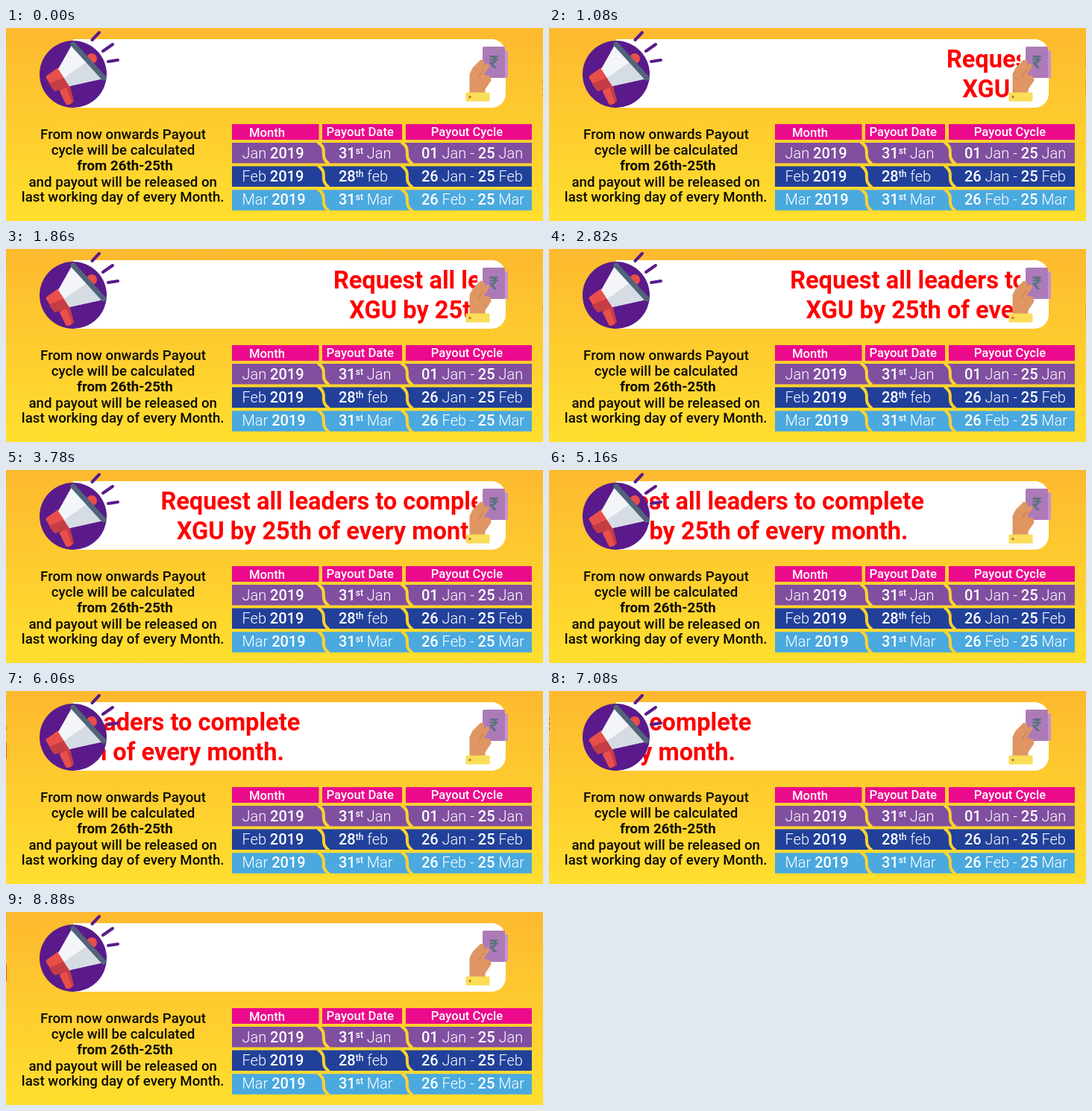
An HTML page with a canvas that plays this animation: 720 px wide and 259 px high, repeating every 8950 ms.

```html
<!DOCTYPE html>
<html lang="en">
<head>
<meta charset="utf-8">
<title>Payout notice</title>
<style>
  html, body { margin: 0; width: 720px; height: 259px; overflow: hidden; }
  canvas { display: block; }
</style>
</head>
<body>
<canvas id="stage" width="720" height="259"></canvas>
<script>
const W = 720, H = 259, LOOP = 8950, STEP = 30, LAST = 8880;
const SPEED = 108.5 / 900;   // px per ms
const START = 894;           // centre of the banner text at time 0
const ctx = document.getElementById('stage').getContext('2d');
const font = (weight, size) => `${weight} ${size}px Roboto, Arial, sans-serif`;

function rect(c, color, x, y, w, h, r = 0) {
  c.fillStyle = color;
  c.beginPath();
  c.roundRect(x, y, w, h, r);
  c.fill();
}

function poly(c, color, pts, round = 0) {
  c.beginPath();
  pts.forEach(([x, y]) => c.lineTo(x, y));
  c.closePath();
  c.fillStyle = color;
  c.fill();
  if (round) {
    c.lineJoin = 'round';
    c.lineWidth = round;
    c.strokeStyle = color;
    c.stroke();
  }
}

function line(c, color, width, x1, y1, x2, y2) {
  c.strokeStyle = color;
  c.lineWidth = width;
  c.lineCap = 'round';
  c.beginPath();
  c.moveTo(x1, y1);
  c.lineTo(x2, y2);
  c.stroke();
}

function circle(c, color, x, y, r) {
  c.fillStyle = color;
  c.beginPath();
  c.arc(x, y, r, 0, Math.PI * 2);
  c.fill();
}

function text(c, str, x, y, weight, size, color, align = 'left') {
  c.font = font(weight, size);
  c.fillStyle = color;
  c.textAlign = align;
  c.fillText(str, x, y);
}

// Runs of [string, weight, size, rise], set one after another.
function runs(c, list, x, y) {
  for (const [str, weight, size = 20, rise = 0] of list) {
    text(c, str, x, y - rise, weight, size, '#fff');
    x += c.measureText(str).width;
  }
}

function layer(draw) {
  const cv = document.createElement('canvas');
  cv.width = W;
  cv.height = H;
  draw(cv.getContext('2d'));
  return cv;
}

function drawNote(c) {
  const lines = [
    ['From now onwards Payout', 157, 148.5, 500],
    ['cycle will be calculated', 157, 169.7, 500],
    ['from 26th-25th', 159.5, 191.2, 700],
    ['and payout will be released on', 156.7, 212.5, 500],
    ['last working day of every Month.', 156.7, 233.3, 500]
  ];
  for (const [str, x, y, weight] of lines) text(c, str, x, y, weight, 18.7, '#0d0a05', 'center');
}

function drawTable(c) {
  const pink = '#ec0a8c';
  rect(c, pink, 303, 129, 116.5, 21);
  rect(c, pink, 424, 129, 107, 21);
  rect(c, pink, 536, 129, 169, 21);
  text(c, 'Month', 350, 146, 500, 16.7, '#fff', 'center');
  text(c, 'Payout Date', 474.7, 145.3, 500, 16.7, '#fff', 'center');
  text(c, 'Payout Cycle', 618, 145.3, 500, 16.6, '#fff', 'center');

  const rows = [
    ['#804fa0', 154, 'Jan', '31', 'st', 'Jan', '01', 'Jan', 'Jan'],
    ['#21409a', 185.4, 'Feb', '28', 'th', 'feb', '26', 'Jan', 'Feb'],
    ['#4aa9df', 217.2, 'Mar', '31', 'st', 'Mar', '26', 'Feb', 'Mar']
  ];
  rows.forEach(([color, y, month, day, suffix, paid, from, m1, m2], i) => {
    const base = 175 + 31 * i;
    rect(c, color, 303, y, 402, 27.5);
    for (const x of [418, 530]) {
      c.strokeStyle = '#fdd22f';
      c.lineWidth = 4;
      c.lineCap = 'butt';
      c.beginPath();
      c.moveTo(x, y - 1);
      c.bezierCurveTo(x + 16, y + 10, x, y + 17, x + 15, y + 28.5);
      c.stroke();
    }
    runs(c, [[month + ' ', 300], ['2019', 500]], 316.5, base);
    runs(c, [[day, 500], [suffix, 500, 12, 6], [' ' + paid, 300]], 446, base);
    runs(c, [[from, 500], [` ${m1} - `, 300], ['25', 500], [' ' + m2, 300]], 557, base);
  });
}

function drawMegaphone(c) {
  const purple = '#5a1a8b', red = '#e94f4a', shade = '#c53d44';
  circle(c, purple, 90, 62, 45);
  line(c, purple, 4, 115.5, 16, 125, 6);
  line(c, purple, 4, 130, 31, 143, 22);
  line(c, purple, 4, 137, 45, 150, 43);

  poly(c, shade, [[76, 84], [84, 79], [89, 98], [83, 101]], 4);
  poly(c, red, [[74, 85], [80, 82], [86, 100], [82, 101]], 4);
  poly(c, red, [[56, 66], [70, 56], [83, 77], [66, 82]], 5);
  poly(c, shade, [[61, 76], [78, 69], [83, 77], [66, 82]], 5);
  circle(c, '#e94f4a', 115, 41, 7);
  poly(c, '#f3f5f8', [[88, 23], [130, 68], [85, 78], [70, 55]]);
  poly(c, '#d5dce4', [[109, 45], [130, 68], [85, 78], [78, 67]]);
  line(c, '#51647a', 7, 90, 22, 131, 67);
}

function drawHand(c) {
  rect(c, '#c795c6', 644, 30, 29, 37, 2);
  rect(c, '#ad7ab8', 639, 25, 30, 42, 2);
  c.font = '700 24px Roboto, "Noto Sans", "DejaVu Sans", sans-serif';
  c.fillStyle = '#5b7280';
  c.textAlign = 'center';
  c.fillText('\u20b9', 654, 53.5);

  const skin = '#df9663';
  poly(c, skin, [[623, 86], [623, 62], [627, 54], [637, 44], [640, 46],
    [640, 64], [648, 66], [649, 70], [641, 82], [641, 86]], 3);
  line(c, skin, 6, 637, 62, 645, 51);
  line(c, '#c77f50', 1.2, 634, 65, 640, 56);
  rect(c, '#fbdd58', 616.5, 86.5, 32, 12, 1);
  circle(c, '#b9793c', 622, 92.5, 1.7);
}

const back = layer(c => {
  const g = c.createLinearGradient(0, 0, 0, H);
  g.addColorStop(0, '#fdb92f');
  g.addColorStop(1, '#ffdf2e');
  c.fillStyle = g;
  c.fillRect(0, 0, W, H);
  rect(c, '#fff', 90, 15, 580, 92, [0, 19, 19, 0]);
  drawNote(c);
  drawTable(c);
});

const front = layer(c => {
  drawMegaphone(c);
  drawHand(c);
});

// The banner text shows between the two icons and in a faint sliver at each side.
const view = new Path2D();
view.rect(90, 15, 542, 92);
view.rect(0, 15, 0.6, 92);
view.rect(W - 0.2, 15, 0.2, 92);

function render(ms) {
  const t = Math.min(Math.floor((ms % LOOP) / STEP) * STEP, LAST);
  const x = START - SPEED * t;
  ctx.drawImage(back, 0, 0);
  ctx.save();
  ctx.clip(view);
  text(ctx, 'Request all leaders to complete', x, 53, 700, 32.6, '#fe0000', 'center');
  text(ctx, 'XGU by 25th of every month.', x, 93, 700, 32.6, '#fe0000', 'center');
  ctx.restore();
  ctx.drawImage(front, 0, 0);
}

let begin = null;
function tick(now) {
  if (begin === null) begin = now;
  render(Math.max(0, now - begin));
  requestAnimationFrame(tick);
}
render(0);
requestAnimationFrame(tick);
</script>
</body>
</html>
```
